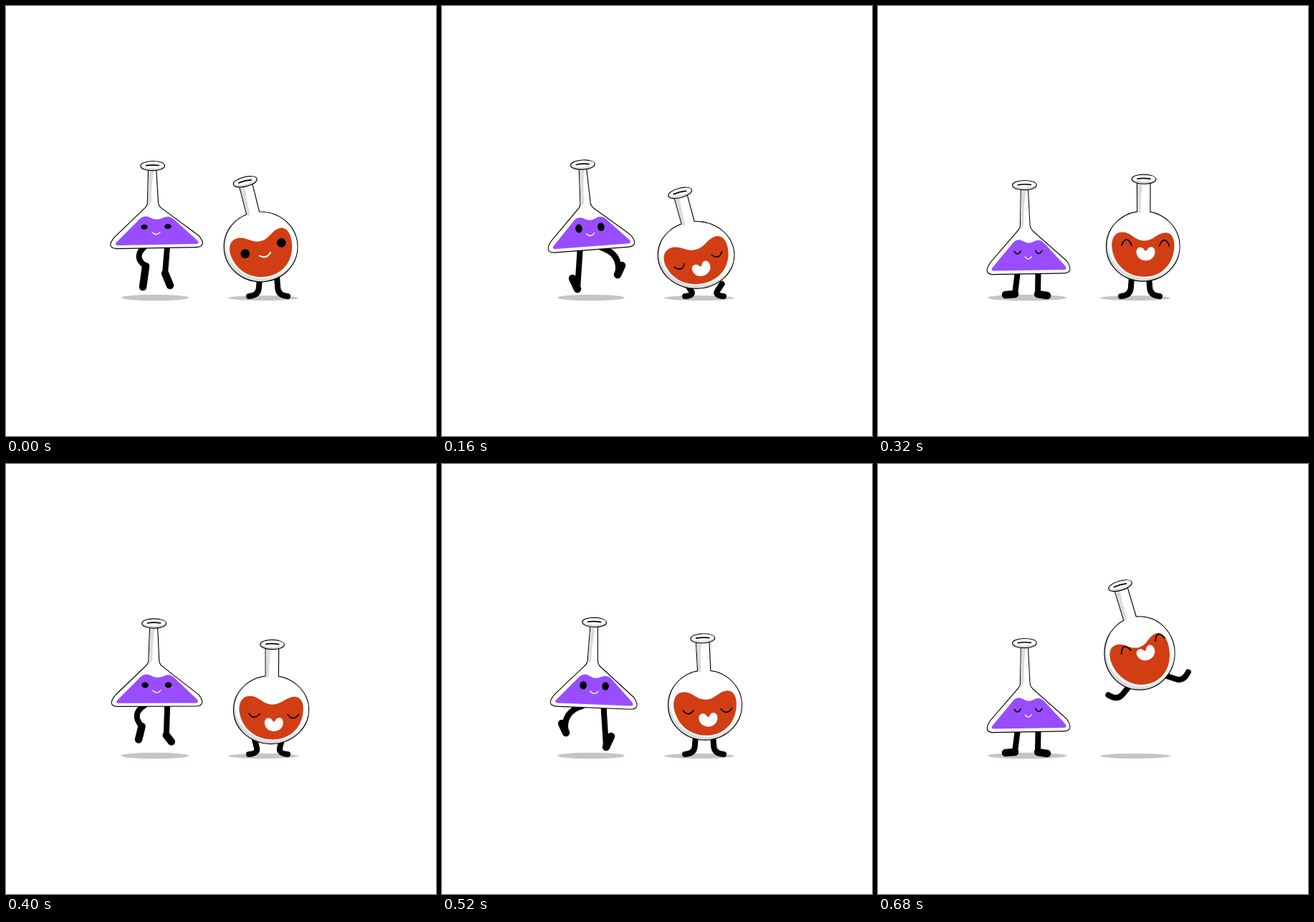
An HTML page with a canvas for the animation above (0.72 s loop, 600 by 600 pixels).

```html
<!DOCTYPE html>
<html lang="en">
<head>
<meta charset="utf-8">
<title>Dancing flasks</title>
<style>
html, body { margin: 0; width: 100%; height: 100%; overflow: hidden; background: #fff; }
canvas { display: block; }
</style>
</head>
<body>
<canvas id="stage" width="600" height="600"></canvas>
<script>
const ctx = document.getElementById('stage').getContext('2d');
const STEP = 40, STEPS = 18, HOP = 9;
const PURPLE = '#994dff', RED = '#d13e14', SHADE = '#dcdcdc', SHADOW = '#c9c3c5';

const coneGlass = new Path2D('M-9-108L-11-62Q-11-57-16-53L-58-14Q-70 0-56 1L56 1Q70 0 59-14L8-53Q3-57 3-62L1-108Z');
const coneLiquid = new Path2D('M-54-9Q-61-3-52-3L54-3Q62-3 56-9L27-36Q19-45 9-40Q0-36-8-41Q-18-46-26-36Z');
const coneShade = new Path2D('M-9-106L-2-106Q-6-85-6-62L-11-56Q-10-80-9-106Z');
const ballLiquid = new Path2D('M-43 0C-43-14-37-20-28-20C-15-19-12-8 2-8C14-8 20-20 31-20C41-20 44-8 43 2C41 28 24 44 2 44C-24 44-41 24-43 0Z');
const openMouth = new Path2D('M-13-2C-13-10-4-10-2-5Q0-2 2-5C4-11 13-11 13-2C13 5 7 10 0 10C-7 10-13 5-13-2Z');

const rad = deg => deg * Math.PI / 180;
const mix = (a, b, k) => a + (b - a) * k;

// Value at time t on straight lines through the given times and values.
function track(t, times, values) {
  const i = times.findIndex(time => time > t);
  return mix(values[i - 1], values[i], (t - times[i - 1]) / (times[i] - times[i - 1]));
}

function placed(x, y, tilt, draw) {
  ctx.save();
  ctx.translate(x, y);
  ctx.rotate(rad(tilt));
  draw();
  ctx.restore();
}

function ellipsePath(x, y, rx, ry) {
  const path = new Path2D();
  path.ellipse(x, y, rx, ry, 0, 0, Math.PI * 2);
  return path;
}

function fill(path, color) {
  ctx.fillStyle = color;
  ctx.fill(path);
}

function stroke(path, color, width) {
  ctx.strokeStyle = color;
  ctx.lineWidth = width;
  ctx.stroke(path);
}

const limb = (d, width) => stroke(new Path2D(d), '#000', width);
const outline = path => stroke(path, '#000', 2.3);
const oval = (x, y, rx, ry, color) => fill(ellipsePath(x, y, rx, ry), color);

// A curve from (x - w, y) to (x + w, y), bulging by h.
const bow = (x, y, w, h, color, width) =>
  stroke(new Path2D(`M${x - w} ${y}Q${x} ${y + 2 * h} ${x + w} ${y}`), color, width);

function lip() {
  const rim = ellipsePath(0, 0, 16.3, 6);
  outline(rim);
  fill(rim, SHADE);
  oval(.5, -1.2, 15.5, 4.6, '#fff');
  bow(0, -.5, 9, -.8, '#000', 1.7);
}

// Legs of the cone as [ankle x, ankle y, toe dx, toe dy, knee bend],
// measured from the middle of the shadow, for a hop to the left.
const dangle = [[-14, -42, -4, 29, -17], [13, -32, 7, 17, 0]];
const kick = [[-20, -10, -7, -15, 0], [36, -30, 6, -13, 20]];
const lunge = [[-29, -2, 13, 1, 0], [48, -6, 9, -2, 0]];
const plant = [[-18, -3, -13, 1, 0], [14, -3, 13, 2, 0]];

const flip = legs => legs.map(([x, y, dx, dy, bend]) => [-x, y, -dx, dy, -bend]).reverse();

// Two equal hops per loop: first to the left, then mirrored to the right.
function drawCone(step) {
  const side = step < HOP ? -1 : 1;
  const aimed = legs => side < 0 ? legs : flip(legs);
  const at = (float, hop, lean, stand) =>
    track(step % HOP, [0, 4, 6, 8, HOP], [float, hop, lean, stand, float]);

  const lean = side * at(0, .16, 1, 0);
  const x = 210 + 9 * lean, y = at(336, 338.5, 366, 372), tilt = 20.5 * lean - 1;
  const width = at(1, .94, .99, .9), height = at(1, 1.04, .95, 1.08);
  const eye = at(3.4, 5.8, 4.8, 0);
  oval(208, 407, at(47, 47, 50, 55), 4.3, SHADOW);

  const poses = [dangle, aimed(kick), aimed(lunge), plant];
  [-17, 15].forEach((hip, n) => {
    const [ax, ay, dx, dy, bend] = dangle[n].map((_, i) => at(...poses.map(legs => legs[n][i])));
    const hx = x + hip * width * Math.cos(rad(tilt)), hy = y + hip * Math.sin(rad(tilt));
    const footX = 209 + ax, footY = 405 + ay;
    const length = Math.hypot(footX - hx, footY - hy);
    const kneeX = (hx + footX) / 2 + bend * (footY - hy) / length;
    const kneeY = (hy + footY) / 2 - bend * (footX - hx) / length;
    limb(`M${hx} ${hy}Q${kneeX} ${kneeY} ${footX} ${footY}`, 8);
    limb(`M${footX} ${footY}l${dx} ${dy}`, 10.5);
  });

  placed(x, y, tilt, () => {
    ctx.save();
    ctx.scale(width, height);
    outline(coneGlass);
    fill(coneGlass, '#fff');
    fill(coneShade, SHADE);
    fill(coneLiquid, PURPLE);
    ctx.restore();

    for (const ex of [-16.5 * width, 16.5 * width]) {
      if (eye < 1) bow(ex, -28 * height, 4.5, 4, '#000', 1.6);
      else oval(ex, -28 * height, 4.8, eye, '#000');
    }
    bow(0, -20.5 * height, eye < 1 ? 4.5 : 5.5, 3.2, '#fff', 1.4);
    placed(-3.5, -113 * height, -.35 * tilt, lip);
  });
}

function moodAt(step) {
  if (step < 2) return 'open';
  return step < 5 || (step > 8 && step < 14) ? 'closed' : 'happy';
}

// The ball bobs between crouching and stretching, then leaps.
function drawBall(step) {
  const at = (...values) => track(step, [0, 4, 6, 10, 13, 15, 17, STEPS], [...values, values[0]]);
  const y = at(336, 347.5, 327.5, 343, 336.5, 314, 264);
  const tilt = at(-13.5, -14.5, .5, 1, -2, -2, -16);
  const air = at(0, 0, 0, 0, 0, 0, 1);
  const x = 369 + tilt + 12 * air;
  const squash = Math.max(-1, (y - 328) / 6);
  const rx = 49.5 + squash, ry = 49.5 - squash;
  const mood = moodAt(step);
  oval(359, 407.5, 49, 3.5, SHADOW);

  // On the ground the feet stay put; in the air they spread with the body.
  const spread = 12 + Math.max(0, y - 337) * 1.2;
  const cos = Math.cos(rad(tilt)), sin = Math.sin(rad(tilt));
  for (const side of [-1, 1]) {
    const joint = (groundX, groundY, airX, airY) => [
      mix(366 + side * groundX, x + side * airX * cos - airY * sin, air),
      mix(groundY, y + side * airX * sin + airY * cos, air)
    ];
    const [hx, hy] = joint(spread, y + ry - 6, 26, 40);
    const [ax, ay] = joint(14, 404, 48, 55);
    const [tx, ty] = joint(27, 405, 58, 44);
    limb(`M${hx} ${hy}L${mix(hx, ax, .6)} ${mix(hy, ay, .6)}Q${ax} ${ay} ${tx} ${ty}`, 8);
  }

  const top = 3 - 2 * ry;
  const neck = new Path2D(`M-9 ${top}L-8 ${8 - ry}L9 ${8 - ry}L8.5 ${top}Z`);
  const ball = ellipsePath(x, y, rx, ry);
  placed(x, y, tilt, () => outline(neck));
  outline(ball);
  fill(ball, SHADE);
  ctx.save();
  ctx.clip(ball);
  oval(x + 2, y - 4, rx, ry, '#fff');
  ctx.restore();
  placed(x, y, tilt, () => {
    fill(neck, '#fff');
    fill(new Path2D(`M-9 ${top}L-1 ${top}Q-4 ${top + 15}-4 ${2 - ry}L-8 ${2 - ry}Z`), SHADE);
    placed(0, top, 0, lip);
    ctx.scale(rx / 50, ry / 50);
    fill(ballLiquid, RED);
  });

  const faceY = { open: 2, closed: 8, happy: -5 }[mood] - 9 * air;
  placed(x + 3.5, y + faceY, 1.25 * tilt, () => {
    for (const ex of [-.52 * rx, .52 * rx]) {
      if (mood === 'open') oval(ex, 0, 6.4, 6.4, '#000');
      else if (mood === 'closed') bow(ex, -2, 7.5, 5, '#000', 1.7);
      else bow(ex, 4, 7, -8, '#000', 1.8);
    }
    if (mood === 'open') bow(0, 8.5, 8, 4, '#fff', 2);
    else placed(.5, mood === 'closed' ? 12 : 15, 0, () => fill(openMouth, '#fff'));
  });
}

const start = performance.now();

function draw() {
  const step = Math.floor((performance.now() - start) / STEP) % STEPS;
  ctx.fillStyle = '#fff';
  ctx.fillRect(0, 0, 600, 600);
  ctx.lineCap = ctx.lineJoin = 'round';
  drawCone(step);
  drawBall(step);
  requestAnimationFrame(draw);
}
draw();
</script>
</body>
</html>
```
